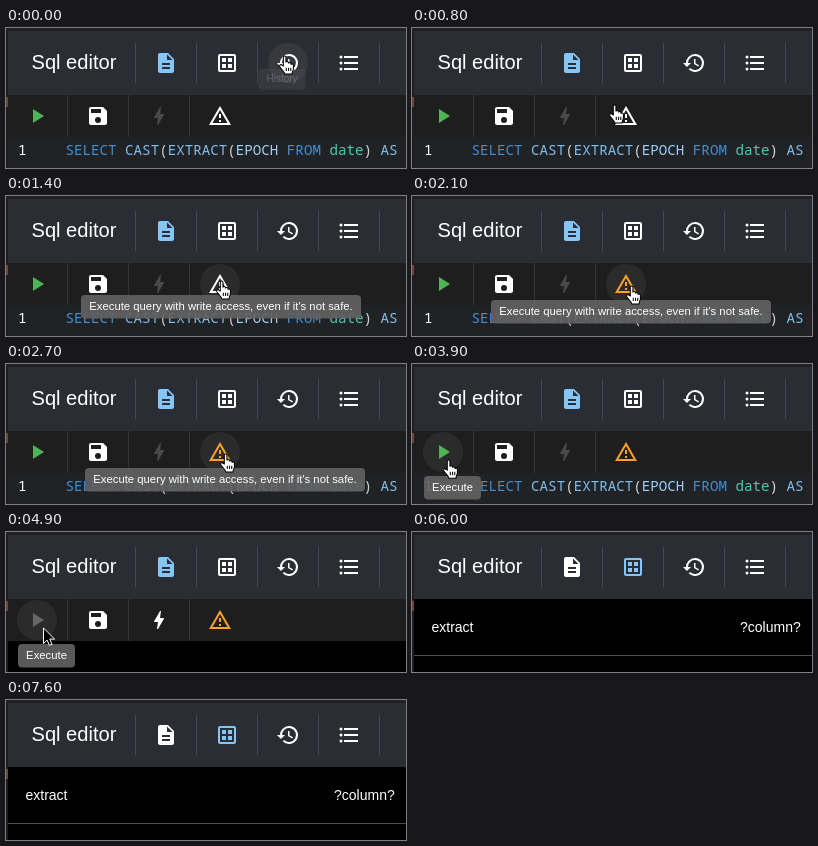
Write an HTML page that moves like this. It is 400 by 140 pixels and loops after 8 s.

```html
<!DOCTYPE html>
<html lang="en">
<head>
<meta charset="utf-8">
<title>Sql editor</title>
<style>
  html, body { margin: 0; width: 100%; height: 100%; overflow: hidden; background: #000; }
  svg { display: block; width: 400px; height: 140px; font-family: "Liberation Sans", Arial, sans-serif; }
  text { white-space: pre; }
  .code { font: 14.2px "Noto Sans Mono", "DejaVu Sans Mono", monospace; }
  .tip { font-size: 11.3px; }
</style>
</head>
<body>
<svg id="stage" viewBox="0 0 400 140"></svg>
<script>
const LOOP = 8000;
const EXECUTE = 4800, RESULTS = 5000;
const BLUE = '#86c5f8', ORANGE = '#ffa02b';

const icons = {
  doc: 'M14 2H6c-1.1 0-2 .9-2 2v16c0 1.1.9 2 2 2h12c1.1 0 2-.9 2-2V8l-6-6zm2 16H8v-2h8v2zm0-4H8v-2h8v2zm-3-5V3.5L18.5 9H13z',
  grid: 'M5 3h14q2 0 2 2v14q0 2-2 2H5q-2 0-2-2V5q0-2 2-2zM5 5v14h14V5zM7 7h4v4H7zM13 7h4v4h-4zM7 13h4v4H7zM13 13h4v4h-4z',
  history: 'M13 3a9 9 0 0 0-9 9H1l3.9 3.9L9 12H6a7 7 0 1 1 2.06 4.94l-1.42 1.42A9 9 0 1 0 13 3zm-1 5v5l4.28 2.54.72-1.21-3.5-2.08V8H12z',
  list: 'M2.5 6a1.5 1.5 0 1 0 3 0a1.5 1.5 0 1 0-3 0zM2.5 12a1.5 1.5 0 1 0 3 0a1.5 1.5 0 1 0-3 0zM2.5 18a1.5 1.5 0 1 0 3 0a1.5 1.5 0 1 0-3 0zM7 5h14v2H7zM7 11h14v2H7zM7 17h14v2H7z',
  play: 'M8 5v14l11-7z',
  save: 'M17 3H5c-1.1 0-2 .9-2 2v14c0 1.1.9 2 2 2h14c1.1 0 2-.9 2-2V7l-4-4zm-5 16a3 3 0 1 1 0-6a3 3 0 0 1 0 6zm3-10H5V5h10v4z',
  bolt: 'M11 21h-1l1-7H7.5c-.88 0-.33-.75-.31-.78C8.48 10.94 10.42 7.54 13.01 3h1l-1 7h3.51c.4 0 .62.19.4.66C12.97 17.55 11 21 11 21z',
  warning: 'M12 5.99L19.53 19H4.47L12 5.99M12 2L1 21h22L12 2zm1 14h-2v2h2v-2zm0-6h-2v4h2v-4z'
};
const buttons = {
  doc: [160, 35], grid: [221, 35], history: [282, 35], list: [343, 35],
  play: [31, 88], save: [92, 88], bolt: [153, 88], warning: [214, 88]
};

// Cursor hotspot: [ms, x, y]
const path = [
  [0, 279, 29], [300, 236, 78], [500, 186, 108], [700, 194, 98], [900, 212, 58],
  [1100, 213, 72], [1400, 216, 86], [1700, 220, 91], [2800, 220, 91], [2900, 214, 92],
  [3000, 150, 98], [3100, 89, 102], [3400, 52, 101], [3600, 37, 98], [4700, 37, 95]
];

const clamp = (v, low = 0, high = 1) => Math.max(low, Math.min(high, v));
const rect = (x, y, w, h, fill) => `<rect x="${x}" y="${y}" width="${w}" height="${h}" fill="${fill}"/>`;
const label = (x, y, size, text) => `<text x="${x}" y="${y}" font-size="${size}" fill="#fff">${text}</text>`;
const group = (id, body) => `<g id="${id}">${body}</g>`;
const button = name => {
  const [x, y] = buttons[name];
  return `<circle id="${name}Hover" cx="${x}" cy="${y}" r="20" fill="#fff" opacity="0"/>` +
    `<path id="${name}" d="${icons[name]}" transform="translate(${x - 12} ${y - 12})" fill="#fff" fill-rule="evenodd"/>`;
};
const tooltip = (id, width, text) => group(id,
  `<rect x="${-width / 2}" width="${width}" height="23.5" rx="4" fill="#616161" fill-opacity=".92"/>` +
  `<text class="tip" y="15" text-anchor="middle" fill="#fff">${text}</text>`);

const tokens = [
  ['SELECT ', '#3f8fd2'], ['CAST', '#7fbdea'], ['(', '#d4d4d4'], ['EXTRACT', '#7fbdea'], ['(', '#d4d4d4'],
  ['EPOCH ', '#9cd0f5'], ['FROM ', '#3f8fd2'], ['date', '#4ec9b0'], [') ', '#d4d4d4'], ['AS', '#7fbdea']
];
const query = tokens.map(([text, fill]) => `<tspan fill="${fill}">${text}</tspan>`).join('');

document.getElementById('stage').innerHTML =
  rect(0, 0, 400, 140, '#000') +
  rect(0, 0, 400, 3, '#212123') + rect(0, 3, 2, 137, '#1d1d1f') + rect(0, 69, 2, 10, '#6e4638') +
  rect(2, 3, 398, 64, '#2b2d35') +
  [129, 190, 251, 312, 373].map(x => rect(x, 15, 1, 40, '#444650')).join('') +
  label(25.5, 41, 20.1, 'Sql editor') +
  ['doc', 'grid', 'history', 'list'].map(button).join('') +
  group('editor',
    rect(2, 67, 398, 42, '#1e1e1e') +
    [61, 122, 183].map(x => rect(x, 67, 1, 42, '#343434')).join('') +
    ['play', 'save', 'bolt', 'warning'].map(button).join('') +
    group('code', rect(2, 109, 398, 31, '#212225') +
      `<text class="code" x="12" y="127" fill="#fff">1</text><text class="code" x="59.5" y="127">${query}</text>`)) +
  group('results', label(19.5, 100, 14, 'extract') + label(328, 100, 14, '?column?') + rect(2, 123, 398, 1, '#515151')) +
  tooltip('historyTip', 53, 'History') +
  tooltip('warningTip', 280, "Execute query with write access, even if it's not safe.") +
  tooltip('executeTip', 57, 'Execute') +
  '<path id="hand" d="M4.6 9.5V2c0-1.6 2.3-1.6 2.3 0v4.6c0-1.2 2.2-1.2 2.2 0v.8c.2-1.2 2.2-1 2.2.2v.8c.3-1 2.1-.8 2.1.6v3c0 1.6-1.2 2.2-1.2 4.5H6c-.3-2-3-4-4.4-6.3-.8-1.4.8-2.4 1.9-1.3zM7.2 11v3M9.2 11v3M11.1 11v3" fill="#fff" stroke="#000" stroke-width=".9"/>' +
  '<path id="arrow" d="M.5 1v15.5l3.6-3.4 2.3 5.3 2.6-1.1-2.3-5.2h5z" fill="#000" stroke="#fff"/>' +
  '<path id="beam" d="M-3.5-8Q0-8 0-6Q0-8 3.5-8M0-6V6M-3.5 8Q0 8 0 6Q0 8 3.5 8M-2 2H2" fill="none" stroke="#bbb"/>';

const el = id => document.getElementById(id);
const show = (id, on) => el(id).setAttribute('visibility', on ? 'visible' : 'hidden');
const paint = (id, fill) => el(id).setAttribute('fill', fill);
const place = (id, x, y, scale = 1) => el(id).setAttribute('transform', `translate(${x} ${y}) scale(${scale})`);
const fade = (t, start, end) => Math.min(clamp((t - start) / 200), clamp((end - t) / 200));

function showTip(id, x, y, opacity) {
  place(id, x, y, 0.85 + 0.15 * opacity);
  el(id).setAttribute('opacity', opacity);
}

function cursorAt(t) {
  const next = path.findIndex(point => point[0] > t);
  if (next < 0) return path[path.length - 1].slice(1);
  const [t0, x0, y0] = path[next - 1], [t1, x1, y1] = path[next];
  const k = (t - t0) / (t1 - t0);
  return [x0 + (x1 - x0) * k, y0 + (y1 - y0) * k];
}

function render(t) {
  const running = t >= EXECUTE, done = t >= RESULTS;
  const [x, y] = cursorAt(t);

  show('editor', !done);
  show('code', !running);
  show('results', done);
  paint('doc', done ? '#fff' : BLUE);
  paint('grid', done ? BLUE : '#fff');
  paint('play', running ? '#666' : '#4fb457');
  paint('bolt', running ? '#fff' : '#4a4a4a');
  paint('warning', t >= 2100 ? ORANGE : '#fff');

  const hovers = { history: fade(t, -400, 200), warning: fade(t, 1000, 3150), play: fade(t, 3400, 5100) };
  for (const name in hovers) el(name + 'Hover').setAttribute('opacity', 0.06 * hovers[name]);

  // The wide tooltip trails the cursor while it is over its button.
  showTip('historyTip', 276, 41, fade(t, -400, 50));
  showTip('warningTip', clamp(x, 194, 220) - 1, clamp(y + 13, 99, 104), fade(t, 1200, 3140));
  showTip('executeTip', 40.5, 112, done ? 0 : fade(t, 3500, 6000));

  const overButton = Object.values(buttons).some(([bx, by]) => Math.hypot(bx - x, by - y) < 20);
  const inCode = y > 109;
  show('hand', !running && overButton);
  show('arrow', !done && (running || !overButton && !inCode));
  show('beam', done && t < 6000 || !running && !overButton && inCode);
  place('hand', x - 7, y - 2, 1.15);
  place('arrow', x, y);
  if (done) place('beam', 41.5, 98);
  else place('beam', x, y);
}

function tick() {
  const t = performance.now() % LOOP;
  render(Math.floor(t / 100) * 100);
  requestAnimationFrame(tick);
}
tick();
</script>
</body>
</html>
```
